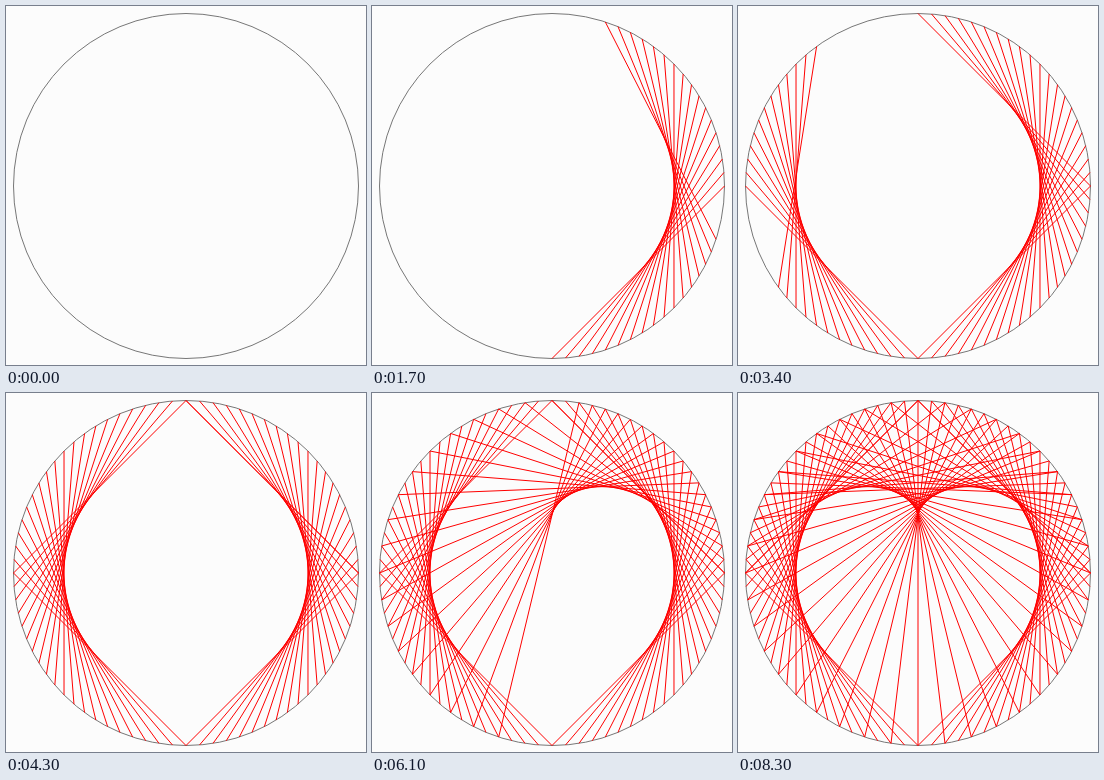
Write an HTML page with a canvas that moves like this. It is 360 by 359 pixels and loops after 8400 ms.

```html
<!DOCTYPE html>
<html lang="en">
<head>
<meta charset="utf-8">
<title>Heart of chords</title>
<style>
  html, body { margin: 0; width: 100%; height: 100%; overflow: hidden; background: #fcfcfc; }
  canvas { display: block; }
</style>
</head>
<body>
<canvas id="stage" width="360" height="359"></canvas>
<script>
const ctx = document.getElementById('stage').getContext('2d');
const CENTER = 180, RADIUS = 172.5, STEP = 4.5;
const FRAME_MS = 100, FRAMES = 84;

// Angles in degrees, counter-clockwise from the right.
function sweep(count, from, fromStep, to, toStep) {
  return Array.from({ length: count }, (_, k) => [from + k * fromStep, to + k * toStep]);
}

const chords = [
  ...sweep(21, 0, STEP, -90, STEP),      // right arc
  ...sweep(21, 180, -STEP, 270, -STEP),  // left arc
  ...sweep(41, 0, STEP, 90, 2 * STEP)    // cardioid top
];

function rim(degrees) {
  const a = degrees * Math.PI / 180;
  return [CENTER + RADIUS * Math.cos(a), CENTER - RADIUS * Math.sin(a)];
}

function draw(count) {
  ctx.fillStyle = '#fcfcfc';
  ctx.fillRect(0, 0, 360, 359);
  ctx.lineWidth = 1;

  ctx.strokeStyle = '#777';
  ctx.beginPath();
  ctx.arc(CENTER, CENTER, RADIUS, 0, 2 * Math.PI);
  ctx.stroke();

  ctx.strokeStyle = '#f00';
  for (const [from, to] of chords.slice(0, count)) {
    ctx.beginPath();
    ctx.moveTo(...rim(from));
    ctx.lineTo(...rim(to));
    ctx.stroke();
  }
}

function tick() {
  draw(Math.floor(performance.now() / FRAME_MS) % FRAMES);
  requestAnimationFrame(tick);
}
tick();
</script>
</body>
</html>
```
